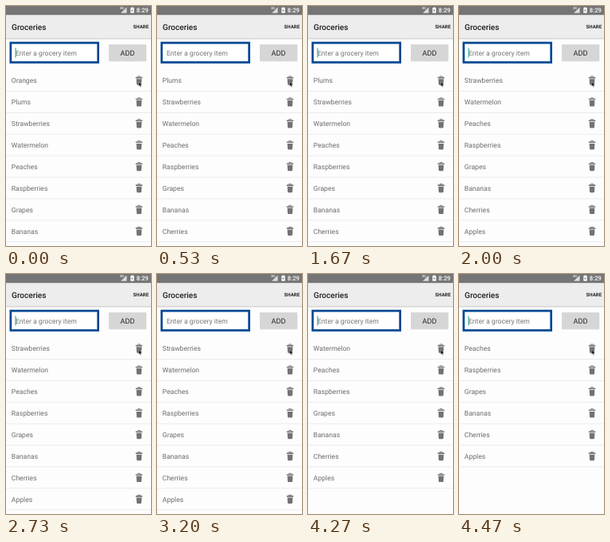
Recreate the animation shown at these times as an HTML page. Size 182 px wide and 300 px high, loop 4790 ms.

```html
<!DOCTYPE html>
<html lang="en">
<head>
<meta charset="utf-8">
<title>Groceries</title>
<style>
  html, body { margin: 0; width: 100%; height: 100%; overflow: hidden; background: #fdfdfd; }
  svg { display: block; width: 100vw; height: 100vh; font-family: Roboto, sans-serif; text-rendering: geometricPrecision; }
  .item { font-size: 8.6px; fill: #6c6c6c; }
</style>
</head>
<body>
<svg viewBox="0 0 182 300">
  <defs>
    <linearGradient id="shade" x2="0" y2="1">
      <stop stop-color="#000" stop-opacity=".2"/>
      <stop offset="1" stop-color="#000" stop-opacity="0"/>
    </linearGradient>
    <g id="trash" fill="#727272">
      <path d="M-1.5-4.2v-.9h3v.9" fill="none" stroke="#727272" stroke-width=".9"/>
      <rect x="-4.3" y="-4.2" width="8.6" height="1.6" rx=".6"/>
      <path d="M-3.4-1.8h6.8l-.4 6.3q-.1 1.2-1.3 1.2h-3.4q-1.2 0-1.3-1.2z"/>
    </g>
  </defs>

  <rect width="182" height="300" fill="#fdfdfd"/>
  <rect y="40" width="182" height="2.5" fill="url(#shade)"/>
  <rect y="11" width="182" height="29" fill="#ededed"/>
  <rect width="182" height="11.2" fill="#757575"/>

  <g fill="#fff">
    <path d="M151.5 1.5v7.3h-7.3z" fill-opacity=".75"/>
    <text x="143" y="4.4" font-size="4" font-weight="500">3G</text>
    <path d="M156.3 2.3h1.3v-.8h1.8v.8h1.3v6.5h-4.4z"/>
    <path d="M158.8 3.4l-1.6 2.5h1l-.4 2 1.7-2.6h-1z" fill="#757575"/>
    <text x="163.8" y="8" font-size="7.7" font-weight="500">8:29</text>
  </g>

  <g fill="#212121" font-weight="500">
    <text x="7" y="29.6" font-size="10.1">Groceries</text>
    <text x="159.6" y="28.2" font-size="6.1" font-weight="700">SHARE</text>
  </g>

  <rect x="5.85" y="46.05" width="109.8" height="24.4" fill="#fff" stroke="#034793" stroke-width="2.7"/>
  <text x="11.9" y="62" font-size="8.64" fill="#757575">Enter a grocery item</text>
  <rect id="caret" x="11.5" y="52.5" width="1.1" height="12" fill="#26a69a"/>

  <rect x="129" y="48.6" width="47.2" height="21" rx="1" fill="#000" opacity=".1"/>
  <rect x="129" y="48" width="47.2" height="20.8" rx="1" fill="#d6d6d6"/>
  <text x="152.5" y="61.5" font-size="9.1" fill="#262626" text-anchor="middle">ADD</text>

  <g id="list"></g>
  <path d="M166.6 94.9v5.6l1.3-1.2 .9 2 1-.4-.9-2h1.7z" fill="#111" stroke="#eee" stroke-width=".3"/>
</svg>
<script>
  const LOOP = 4790, ROW = 26.9, FIRST = 93;
  const groceries = ["Oranges", "Plums", "Strawberries", "Watermelon", "Peaches",
    "Raspberries", "Grapes", "Bananas", "Cherries", "Apples"];
  const deletions = [530, 2000, 3400, 4470];
  // Times at which the caret takes on a new opacity
  const blinks = [[0, 1], [70, .5], [200, 0], [670, 1], [1200, 0], [1670, 1],
    [2200, 0], [2730, 1], [3200, 0], [4200, .5], [4270, 1]];

  const list = document.getElementById("list");
  const caret = document.getElementById("caret");
  let shownRemoved = -1;

  function renderList(removed) {
    list.innerHTML = groceries.slice(removed, removed + 8).map((name, i) => {
      const y = FIRST + i * ROW;
      return `<text class="item" x="6.8" y="${y + 3.2}">${name}</text>
        <use href="#trash" x="167" y="${y}"/>
        <rect y="${y + 13}" width="182" height=".9" fill="#e9e9e9"/>`;
    }).join("");
  }

  function draw(now) {
    const t = now % LOOP;
    const removed = deletions.filter(time => time <= t).length;
    if (removed !== shownRemoved) renderList(shownRemoved = removed);
    caret.setAttribute("opacity", blinks.filter(([time]) => time <= t).pop()[1]);
  }

  function tick() {
    draw(performance.now());
    requestAnimationFrame(tick);
  }
  tick();
</script>
</body>
</html>
```
